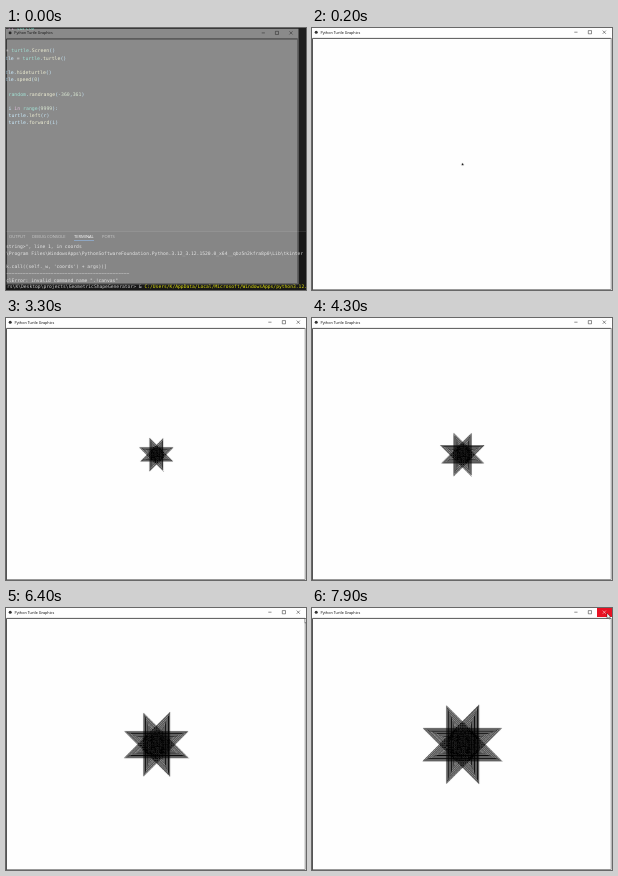
An HTML page with a canvas that plays this animation: 300 by 262 pixels, repeating every 8 s.

```html
<!DOCTYPE html>
<html lang="en">
<head>
<meta charset="utf-8">
<title>Turtle star</title>
<style>
html, body { margin: 0; width: 300px; height: 262px; overflow: hidden; background: #fff; }
svg, canvas { position: absolute; left: 0; top: 0; width: 300px; height: 262px; }
text { white-space: pre; }
#code, #term { font-family: "DejaVu Sans Mono", monospace; }
#code { font-size: 4.85px; fill: #9cdcfe; }
#term { font-size: 4.67px; fill: #ccc; }
#tabs { font: 4.1px "Open Sans", sans-serif; fill: #9d9d9d; }
#title { font: 3.75px "Open Sans", sans-serif; fill: #000; }
.y { fill: #dcdcaa; } .t { fill: #4ec9b0; } .n { fill: #b5cea8; } .w { fill: #d4d4d4; } .k { fill: #c586c0; }
</style>
</head>
<body>
<svg viewBox="0 0 300 262">
  <g id="editor">
    <path fill="#1f1f1f" d="M0 0h300v262H0z"/>
    <path fill="#181818" d="M0 203.5h300V262H0z"/>
    <path stroke="#444" stroke-width=".5" d="M0 203.5h300"/>
    <g id="code">
      <text x="2" y="1.5"><tspan class="k">rt </tspan><tspan class="t">turtle</tspan></text>
      <text x="-.5" y="24"><tspan class="w">= </tspan><tspan class="t">turtle</tspan>.<tspan class="y">Screen</tspan>()</text>
      <text x="-1" y="31.5">tle <tspan class="w">= </tspan><tspan class="t">turtle</tspan>.<tspan class="y">turtle</tspan>()</text>
      <text x="-1" y="46">tle.<tspan class="y">hideturtle</tspan>()</text>
      <text x="-1" y="53">tle.<tspan class="y">speed</tspan>(<tspan class="n">0</tspan>)</text>
      <text x="2.5" y="67.5"><tspan class="t">random</tspan>.<tspan class="y">randrange</tspan>(-<tspan class="n">360</tspan>,<tspan class="n">361</tspan>)</text>
      <text x="2.5" y="82">i <tspan class="k">in </tspan><tspan class="t">range</tspan>(<tspan class="n">9999</tspan>):</text>
      <text x="2.5" y="89">turtle.<tspan class="y">left</tspan>(r)</text>
      <text x="2.5" y="96">turtle.<tspan class="y">forward</tspan>(i)</text>
    </g>
    <g id="tabs">
      <text x="3" y="210">OUTPUT</text>
      <text x="26" y="210">DEBUG CONSOLE</text>
      <text x="68" y="210" fill="#fff">TERMINAL</text>
      <text x="96" y="210">PORTS</text>
      <path stroke="#3794ff" stroke-width=".5" d="M68 212.5h20"/>
    </g>
    <g id="term">
      <text x="0" y="220">string&gt;", line 1, in coords</text>
      <text x="0" y="227">\Program Files\WindowsApps\PythonSoftwareFoundation.Python.3.12_3.12.1520.0_x64__qbz5n2kfra8p0\Lib\tkinter</text>
      <text x="0" y="240">k.call((self._w, 'coords') + args))]</text>
      <text x="0" y="247">~~~~~~~~~~~~~~~~~~~~~~~~~~~~~~~~~~~~~~~~~~~~</text>
      <text x="0" y="253.5">clError: invalid command name ".!canvas"</text>
      <text x="1" y="260.3">rs\K\Desktop\projects\GeometricShapeGenerator&gt; <tspan class="w">&amp;</tspan> <tspan fill="#e5e510">C:/Users/K/AppData/Local/Microsoft/WindowsApps/python3.12.</tspan></text>
    </g>
  </g>
  <g id="window">
    <path fill="#fefefe" d="M0 0h300v262H0z"/>
    <circle cx="4.2" cy="4.2" r="1.5" fill="#333"/>
    <text id="title" x="8.4" y="5.5">Python Turtle Graphics</text>
    <path id="red" fill="#e81123" d="M285 0h15v9H285z"/>
    <path fill="none" stroke="#222" stroke-width=".5" d="M262.3 4.2h3.2M276.3 2.6h3.2v3.2h-3.2z"/>
    <path id="cross" fill="none" stroke-width=".5" d="M290.7 2.6l3.2 3.2m0-3.2l-3.2 3.2"/>
    <path fill="none" stroke="#555" d="M.5 262V10.4H299"/>
    <path fill="none" stroke="#999" d="M299.2 10V261.5H1"/>
  </g>
</svg>
<canvas id="star" width="300" height="262"></canvas>
<svg viewBox="0 0 300 262">
  <path id="cursor" fill="#fff" stroke="#000" stroke-width=".35" d="M0 0v5.2l1.2-1.1.8 1.9.8-.4-.8-1.8h1.7z"/>
</svg>
<script>
const LOOP = 8000, SCALE = 300 / 962, TURN = 135 * Math.PI / 180;
const FIRST = 3, RATE = 0.032, PEN = 1.2;
const $ = id => document.getElementById(id);
const view = $("star").getContext("2d");
view.imageSmoothingQuality = "high";

// The turtle draws hard pixels at full size; the view shrinks them.
const sheet = document.createElement("canvas");
sheet.width = 962;
sheet.height = 840;
const ink = sheet.getContext("2d");
let step, x, y;

function reset() {
  step = 0;
  x = 482;
  y = 437;
  ink.clearRect(0, 0, sheet.width, sheet.height);
}

function line(x0, y0, x1, y1) {
  const dx = Math.round(x1) - Math.round(x0), dy = Math.round(y1) - Math.round(y0);
  const n = Math.max(Math.abs(dx), Math.abs(dy), 1);
  for (let i = 0; i <= n; i++)
    ink.fillRect(Math.round(x0) + Math.round(dx * i / n), Math.round(y0) + Math.round(dy * i / n), PEN, PEN);
}

function drawStar(count) {
  if (count < step) reset();
  while (step < count) {
    const a = TURN * (step + 1);
    const nx = x + step * Math.cos(a), ny = y - step * Math.sin(a);
    line(x, y, nx, ny);
    x = nx;
    y = ny;
    step++;
  }
  view.clearRect(0, 0, 300, 262);
  view.drawImage(sheet, 0, 0, sheet.width * SCALE, sheet.height * SCALE);
}

// time, x, y of the mouse pointer
const path = [[6200, 300, 14], [6400, 299, 10], [6600, 295.5, 5], [7300, 295.5, 5], [7900, 295, 5.2], [8000, 295, 5.2]];

function pointer(t) {
  const i = path.findIndex(p => p[0] > t);
  if (i < 1) return [310, 20];
  const [a, b] = [path[i - 1], path[i]], k = (t - a[0]) / (b[0] - a[0]);
  return [1, 2].map(j => a[j] + (b[j] - a[j]) * k);
}

function frame(now) {
  const t = Math.floor(now % LOOP / 100) * 100;
  const opening = t < 100, hover = t >= 6500;
  $("editor").style.display = opening ? "" : "none";
  $("window").setAttribute("opacity", opening ? 0.48 : 1);
  $("window").setAttribute("transform", opening ? "translate(0 .8) scale(.975)" : "");
  $("red").style.display = hover ? "" : "none";
  $("cross").setAttribute("stroke", hover ? "#fff" : "#222");
  $("cursor").setAttribute("transform", `translate(${pointer(t)})`);
  drawStar(opening ? 0 : Math.round(FIRST + t * RATE));
  requestAnimationFrame(frame);
}

reset();
requestAnimationFrame(frame);
</script>
</body>
</html>
```
